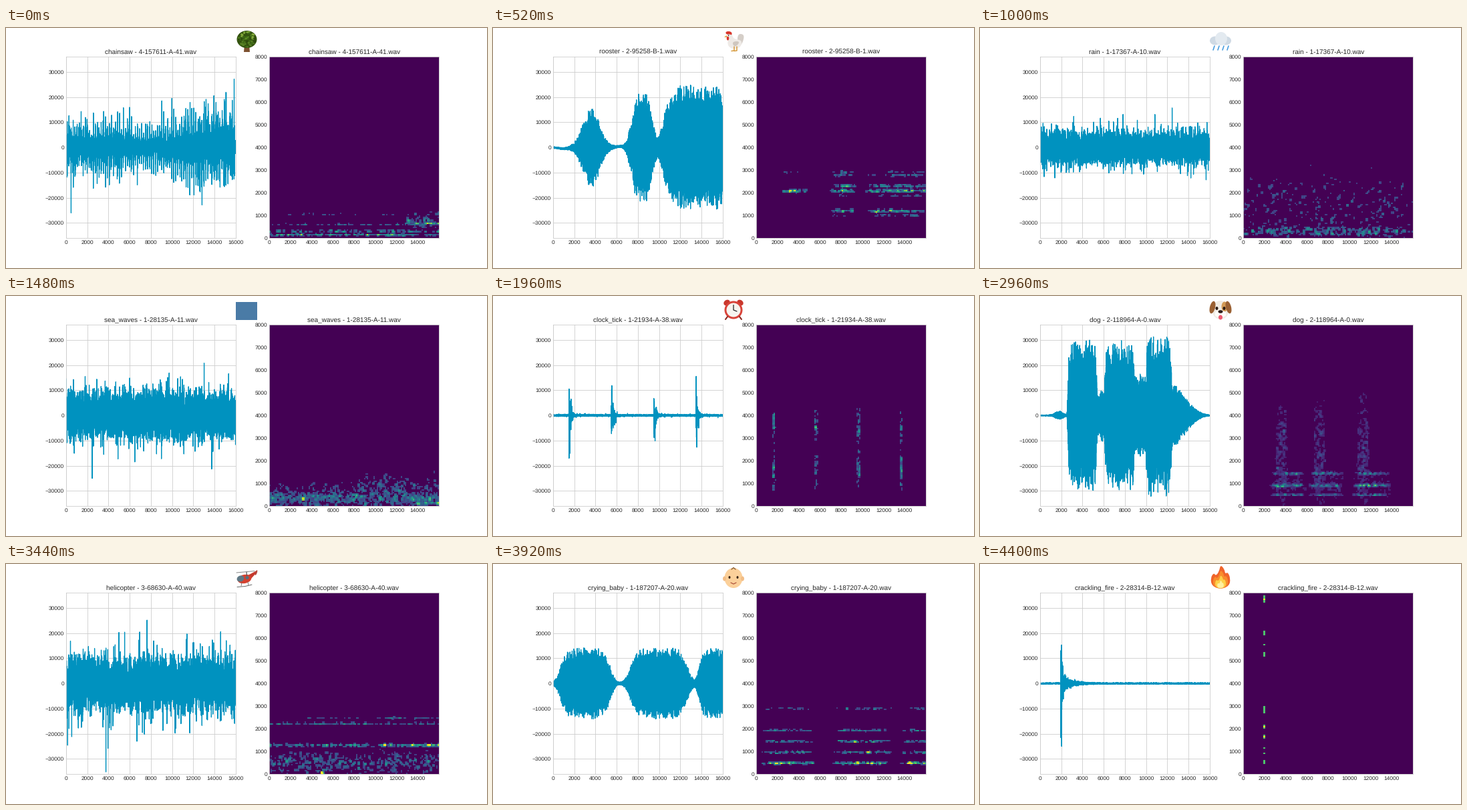
Animation of 720x360 px, one loop 4.92 s. Source, as a matplotlib script:

```python
import numpy as np
import matplotlib.pyplot as plt
from matplotlib.animation import FuncAnimation
from matplotlib.patches import Ellipse, PathPatch, Polygon, Rectangle
from matplotlib.path import Path

STEP = 40
FRAMES = 123
STARTS = [0, 520, 1000, 1480, 1960, 2440, 2960, 3440, 3920, 4400]

plt.rcParams.update({
    "font.family": "Liberation Sans", "font.size": 10,
    "axes.titlesize": 12, "axes.titlepad": 5.5,
    "axes.edgecolor": "0.8", "axes.linewidth": 1, "axes.axisbelow": True,
    "grid.color": "0.8", "grid.linewidth": 1,
    "text.color": "0.15", "xtick.color": "0.15", "ytick.color": "0.15",
    "xtick.major.size": 0, "ytick.major.size": 0,
    "text.hinting": "no_hinting", "agg.path.chunksize": 2000,
})

T = np.arange(0, 16000, 2)
FREQ = ((np.arange(128) + 0.5) * 62.5)[:, None]
TIME = ((np.arange(125) + 0.5) * 128)[None, :]
ALL = (-3000, 19000)


def bump(mid, half, power=2):
    return np.exp(-np.abs((T - mid) / half) ** power)


def decay(start, tau):
    return np.where(T < start, 0, np.exp(-np.maximum(T - start, 0) / tau))


def hiss(level, seed, df=10):
    """Broad noise with rare tall peaks."""
    return level * np.random.default_rng(seed).standard_t(df, T.size)


def tone(level, seed):
    """Filled band that follows its envelope closely."""
    rng = np.random.default_rng(seed)
    rough = np.repeat(rng.uniform(0.72, 1.03, T.size // 16), 16)
    return level * rough * rng.uniform(-1, 1, T.size)


def spectrum(bands, seed, cut=0.18):
    """Noisy bands: centre and spread in Hz, start, end, strength."""
    rng = np.random.default_rng(seed)
    img = np.zeros((128, 125))
    for f, df, t0, t1, amp in bands:
        mid, half = (t0 + t1) / 2, (t1 - t0) / 2
        shape = np.exp(-((FREQ - f) / df) ** 2 - ((TIME - mid) / half) ** 6)
        n = rng.exponential(size=(129, 126))
        n = (n[1:, 1:] + n[:-1, 1:] + n[1:, :-1] + n[:-1, :-1]) / 4
        img = np.maximum(img, amp * shape * n)
    img[img < cut] = 0
    return np.clip(img, 0, 1)


fig = plt.figure(figsize=(12, 6), dpi=60, facecolor="white")
left, right = fig.subplots(1, 2)
fig.subplots_adjust(left=0.125, right=0.9, bottom=0.125, top=0.88, wspace=0.2)
left.set(xlim=(0, 16000), ylim=(-36000, 36000))
left.set_xticks(range(0, 16001, 2000))
left.set_yticks(range(-30000, 30001, 10000))
left.grid(True)
line, = left.plot(T, 0 * T, color="#0092bf", lw=1.5, solid_capstyle="round")
image = right.imshow(np.zeros((128, 125)), cmap="viridis", vmin=0, vmax=1,
                     origin="lower", aspect="auto", interpolation="nearest",
                     extent=(0, 15990, 0, 8000))
right.set_xticks(range(0, 14001, 2000))
right.set_yticks(range(0, 8001, 1000))

# Overlay in stage pixels, y pointing down
top = fig.add_axes([0, 0, 1, 1])
top.set(xlim=(0, 720), ylim=(360, 0))
top.axis("off")


def put(patch):
    return top.add_patch(patch)


def disc(x, y, w, h, color, angle=0):
    return put(Ellipse((x, y), w, h, angle=angle, fc=color, lw=0))


def poly(pts, color):
    return put(Polygon(pts, fc=color, lw=0))


def blob(pts, color):
    """Smooth closed shape guided by a few points."""
    p = np.array(pts, float)
    mids = (p + np.roll(p, -1, axis=0)) / 2
    verts, codes = [mids[-1]], [Path.MOVETO]
    for ctrl, end in zip(p, mids):
        verts += [ctrl, end]
        codes += [Path.CURVE3] * 2
    return put(PathPatch(Path(verts, codes), fc=color, lw=0))


def stroke(pts, color, lw):
    return top.plot(*zip(*pts), color=color, lw=lw, solid_capstyle="round")[0]


def tree():
    rng = np.random.default_rng(4)
    parts = [poly([(357, 25), (364, 25), (365, 36), (356, 36)], "#7d5130"),
             disc(360.5, 17, 30, 26, "#33520f")]
    for _ in range(80):
        a, r = rng.uniform(0, 2 * np.pi), np.sqrt(rng.random())
        x, y = 360.5 + 13 * r * np.cos(a), 17 + 11.5 * r * np.sin(a)
        shades = ["#5f8f24", "#86ad3c", "#3f6a17"] if y < 16 else \
                 ["#2c480d", "#3f6a17", "#567f24"]
        parts.append(disc(x, y, 3.4, 2.4, shades[rng.integers(3)]))
    return parts


def rooster():
    legs = [stroke([(x, 28), (x, 34), (x - 4, 34.5)], "#d69a3c", 1.8)
            for x in (361, 365)]
    return legs + [
        blob([(366, 22), (366, 11), (371, 8), (377, 12), (371, 28)], "#d5cec8"),
        blob([(350, 8), (357, 7), (360, 17), (373, 18), (371, 29), (360, 32),
              (351, 27), (352, 16)], "#eeeae6"),
        blob([(359, 20), (370, 20), (364, 28), (359, 26)], "#cfc7bf"),
        blob([(349, 10), (348, 5), (357, 5), (358, 11), (354, 9)], "#d9362b"),
        disc(351.5, 15.5, 3.5, 6, "#d9362b"),
        poly([(350, 11), (346, 13.5), (350, 14)], "#e0a23a"),
        disc(352.5, 11, 1.6, 1.6, "#222222"),
    ]


def rain():
    puffs = [disc(360 + 8 * s, 19, 16, 13, "#cfdae4") for s in (-1, 1)]
    drops = [stroke([(x, 27), (x - 2, 33)], "#4a9fe0", 2)
             for x in range(351, 373, 7)]
    return puffs + [disc(361, 16, 18, 20, "#e3eaf0")] + drops


def sea():
    return [put(Rectangle((344, 9), 32, 27, fc="#4a7ba6", lw=0))]


def clock():
    parts = []
    for s in (-1, 1):
        parts += [disc(360 + 10 * s, 10, 10, 8, "#c9372c", 35 * s),
                  stroke([(360 + 9 * s, 31), (360 + 12 * s, 35)], "#8c2a22", 2.5)]
    return parts + [
        disc(360, 21, 27, 27, "#d9443a"), disc(360, 21, 21, 21, "#f6f4ef"),
        stroke([(360, 13.5), (360, 21), (365, 23)], "#222222", 1.5),
    ]


def sneeze():
    parts = [disc(360, 20, 30, 30, "#f2b32c"), disc(360, 19, 28, 27, "#fdcf3f"),
             disc(360, 15, 22, 17, "#ffdd58")]
    for s in (-1, 1):
        parts += [stroke([(360 + 9 * s, 13.5), (360 + 4 * s, 16.5),
                          (360 + 9 * s, 19)], "#5d3a12", 1.8),
                  stroke([(360 + 9 * s, 10), (360 + 5 * s, 8.5)], "#8a5a1a", 1.4)]
    return parts + [
        blob([(345, 23), (351, 26), (357, 21), (364, 23), (357, 36),
              (346, 37)], "#e4ebee"),
        stroke([(350, 33), (355, 28), (358, 24)], "#b3c1c8", 1),
    ]


def dog():
    parts = [disc(360, 21, 25, 28, "#f1ece4"), disc(366, 16, 9, 15, "#d29a55")]
    for s in (-1, 1):
        parts += [disc(360 + 12 * s, 17, 8, 19, "#9a6032", -14 * s),
                  disc(360 + 5.5 * s, 18.5, 4, 5, "#2b1b14"),
                  disc(360 + 4 * s, 27, 9, 9, "#fffdf9")]
    return parts + [disc(360, 32, 6, 7, "#ee5a6f"),
                    disc(360, 23.5, 7, 4.6, "#2b1b14")]


def helicopter():
    return [
        poly([(362, 17), (375, 10), (376, 12), (365, 24)], "#c63a2c"),
        stroke([(360, 12), (360.5, 17)], "#555555", 1.5),
        disc(357, 22.5, 21, 13, "#d5412f", -12),
        disc(351, 22, 11, 9, "#5f7885", -20),
        disc(361, 20.5, 5, 5, "#55707e"),
        stroke([(353, 28), (352, 33)], "#6b6b6b", 1),
        stroke([(362, 27), (363, 32)], "#6b6b6b", 1),
        stroke([(346, 34.5), (358, 33.5), (368, 31)], "#6b6b6b", 1.2),
        stroke([(345, 13), (372, 10.5)], "#888888", 1.2),
        disc(374.5, 13, 2.5, 8, "#b5463c", 20),
    ]


def baby():
    parts = [disc(360, 21, 27, 30, "#fbd09a"),
             stroke([(357, 8), (360, 5.5), (363, 8)], "#8a5a2c", 1.6),
             stroke([(356, 28), (360, 30), (364, 28)], "#b0543c", 1.5)]
    for s in (-1, 1):
        parts += [disc(360 + 13.5 * s, 22, 5, 7, "#f2bd86"),
                  disc(360 + 6 * s, 20, 3, 4, "#3b2617")]
    return parts


def fire():
    flame = np.array([(0, -35), (6, -28), (7, -21), (11, -24), (15, -14),
                      (13, -3), (0, 2), (-13, -3), (-15, -15), (-10, -23),
                      (-7, -18), (-2, -25)])
    colors = ["#f0642a", "#f98c2b", "#fdcf48", "#fff0a0"]
    return [blob(flame * (1 - 0.22 * i) + (360, 36), c)
            for i, c in enumerate(colors)]


scenes = []


def scene(title, y, img, icon):
    parts = icon()
    for part in parts:
        part.set_visible(False)
    scenes.append((title, y, img, parts))


pulse = 0.25 + 0.75 * np.sin(np.pi * T / 190) ** 4
level = 5500 - 800 * bump(7500, 1500) + 2200 * bump(13500, 3500, 4)
bands = [(150 * k, 65, *ALL, 0.4 / k ** 0.5) for k in (1, 2, 4, 7)]
bands += [(150, 60, 10600, 13000, 0.7), (640, 60, 12800, 16500, 0.5),
          (800, 450, 12800, 16500, 0.2)]
scene("chainsaw - 4-157611-A-41.wav", hiss(level * pulse, 1, 30),
      spectrum(bands, 1), tree)

level = (400 + 15500 * bump(3600, 1100) + 22500 * bump(8400, 1130, 3)
         + 24000 * bump(13800, 3500, 8))
drift = -500 * bump(1000, 700) + 400 * bump(6300, 500)
calls = [(2300, 4900), (7000, 9400), (10200, 16400)]
bands = [(f, df, *c, amp) for c in calls
         for f, df, amp in [(2080, 85, 0.5), (2900, 90, 0.17)]]
bands += [(f, 80, *c, amp) for c in calls[1:]
          for f, amp in [(1000, 0.18), (1200, 0.4), (1850, 0.18),
                         (2300, 0.35), (2780, 0.2)]]
scene("rooster - 2-95258-B-1.wav", tone(level, 2) + drift,
      spectrum(bands, 2), rooster)

scene("rain - 1-17367-A-10.wav", hiss(2600, 3),
      spectrum([(1500, 2000, *ALL, 0.12), (300, 250, *ALL, 0.25)], 3), rain)

scene("sea_waves - 1-28135-A-11.wav", hiss(3700, 4),
      spectrum([(350, 260, *ALL, 0.3), (400, 750, *ALL, 0.19),
                (900, 700, 7000, 17000, 0.16), (150, 120, 13500, 16500, 0.45)],
               4), sea)

beats = range(1500, 15500, 4000)
scene("clock_tick - 1-21934-A-38.wav",
      hiss(150 + sum(5000 * decay(t, 150) for t in beats), 5),
      spectrum([(f, 900, t, t + 350, 0.3) for t in beats
                for f in (1600, 3600)], 5), clock)

level = (150 + 31500 * bump(4150, 800) + 23000 * bump(6500, 1500, 4)
         + 7000 * bump(8500, 1700) + 6000 * bump(2800, 800)
         + 900 * bump(1500, 1000))
bands = [(750, 100, 3500, 5400, 0.38), (760, 50, 4000, 4450, 1.2),
         (2080, 190, 3400, 5000, 0.35), (2000, 350, 5200, 8100, 0.18),
         (330, 130, 5300, 9900, 0.16), (2300, 900, 3600, 7500, 0.11),
         (4900, 400, 4200, 7500, 0.07)]
scene("sneezing - 3-148330-A-21.wav", tone(level, 6),
      spectrum(bands, 6, 0.13), sneeze)

level = np.max([29800 * bump(4000, 1380, 20), 29800 * bump(7500, 1430, 20),
                31500 * bump(11200, 1250, 16), 16000 * bump(9500, 4500, 4),
                200 + 1600 * bump(1800, 500)], axis=0)
bands = [(870, 60, 2900, 3900, 0.8)]
for t0, t1 in [(2600, 5600), (6200, 9400), (10300, 13800)]:
    bands += [(490, 60, t0, t1, 0.33), (900, 90, t0, t1, 0.42),
              (1430, 80, t0 + 200, t1, 0.32), (900, 600, t0, t1 + 500, 0.08),
              (2200, 2600, t0 + 400, t0 + 1600, 0.11)]
scene("dog - 2-118964-A-0.wav", tone(level, 7), spectrum(bands, 7, 0.08), dog)

bands = [(1270, 75, *ALL, 0.33), (2230, 55, *ALL, 0.33),
         (2470, 60, 2500, 9000, 0.2), (2470, 60, 9800, 16500, 0.27),
         (1270, 60, 12600, 16800, 0.55), (500, 620, *ALL, 0.2),
         (60, 50, 4850, 5200, 1.2)]
scene("helicopter - 3-68630-A-40.wav", hiss(4100, 8, 9),
      spectrum(bands, 8), helicopter)

cries = [(600, 5500), (7200, 12800), (13700, 17000)]
level = 500 + sum(14000 * bump((a + b) / 2, (b - a) / 2, 6) for a, b in cries)
scene("crying_baby - 1-187207-A-20.wav", tone(level, 9),
      spectrum([(480 * k, 65, *c, 0.6 / k ** 0.5) for c in cries
                for k in (1, 2, 3, 4, 6)], 9), baby)

level = 120 + 12000 * decay(1950, 90) + 1500 * decay(1950, 900)
img = np.zeros((128, 125))
clicks = [(7700, 2), (6220, 1), (5710, 0), (5310, 1), (2820, 2), (2110, 1),
          (1660, 1), (1150, 0), (900, 0), (560, 1)]
for f, half in clicks:
    row = int(f / 62.5)
    img[row - half:row + half + 1, 15] = 0.72
    if f in (7700, 2110, 1660):
        img[row, 15] = 1
scene("crackling_fire - 2-28314-B-12.wav", hiss(level, 10, 30), img, fire)


def update(i):
    k = np.searchsorted(STARTS, i * STEP, side="right") - 1
    title, y, img, _ = scenes[k]
    left.set_title(title)
    right.set_title(title)
    line.set_ydata(y)
    image.set_data(img)
    for j, entry in enumerate(scenes):
        for part in entry[3]:
            part.set_visible(j == k)


anim = FuncAnimation(fig, update, frames=FRAMES, interval=STEP, repeat=True,
                     repeat_delay=0, init_func=lambda: update(0))
plt.show()
```
